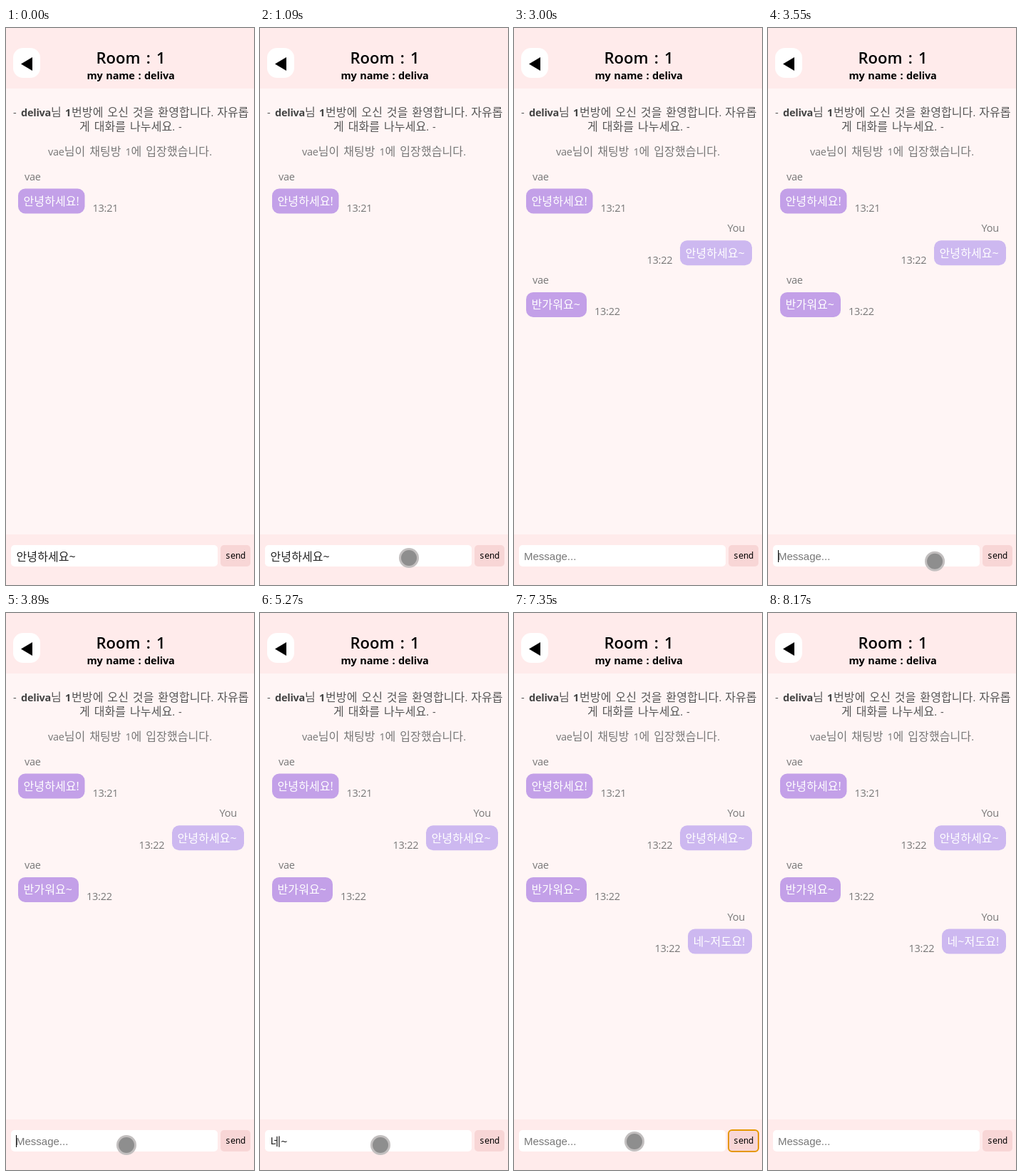
Animation, 348 px wide and 782 px high, one loop 8.24 s. Source, as an HTML page with a canvas:

```html
<!DOCTYPE html>
<html lang="ko">
<head>
<meta charset="utf-8">
<title>Chat room</title>
<style>
  html, body { margin: 0; width: 100%; height: 100%; overflow: hidden; background: #fff5f5; }
  canvas { display: block; width: 348px; height: 782px; }
</style>
</head>
<body>
<canvas id="stage"></canvas>
<script>
const W = 348, H = 782, LOOP = 8240;
const ME = 'deliva', FRIEND = 'vae';
const LATIN = '"Open Sans", "Noto Sans", sans-serif';
const HANGUL = '"Open Sans", "Noto Sans CJK KR", "Noto Sans CJK", sans-serif';

const canvas = document.getElementById('stage');
const ctx = canvas.getContext('2d');
const scale = window.devicePixelRatio || 1;
canvas.width = W * scale;
canvas.height = H * scale;

const messages = [
  { at: 0, mine: false, text: '안녕하세요!', x: 17, w: 93.5, time: '13:21', timeX: 121.5 },
  { at: 1220, mine: true, text: '안녕하세요~', x: 233, w: 101, time: '13:22', timeX: 186.5 },
  { at: 3000, mine: false, text: '반가워요~', x: 17, w: 85, time: '13:22', timeX: 113 },
  { at: 6690, mine: true, text: '네~저도요!', x: 244, w: 90, time: '13:22', timeX: 197.5 }
];

// [start time, input value]
const typing = [
  [0, '안녕하세요~'], [1220, ''], [4220, 'ㄴ'], [4350, '네'], [4810, '네~'],
  [5600, '네~ㅈ'], [5690, '네~저'], [5780, '네~젇'], [5880, '네~저도'],
  [5970, '네~저동'], [6070, '네~저도요'], [6260, '네~저도요!'], [6690, '']
];

const caretOn = [[560, 1090], [1220, 1750], [2210, 2670], [3290, 5270], [5600, 6620]];
const pointerHidden = [[1950, 3290], [4220, 4610], [4810, 4940], [5600, 6350], [7690, LOOP]];

// Stepped pointer strokes along quadratic curves
const strokes = [
  { at: 130, end: 680, steps: 9, path: [[186, 786], [196, 732], [209, 744]] },
  { at: 1750, end: 1880, steps: 3, path: [[214, 737], [230, 712], [246, 688]] },
  { at: 3290, end: 3890, steps: 8, path: [[331, 751], [240, 749], [169, 747]] },
  { at: 7350, end: 7350, steps: 1, path: [[169, 742], [169, 742], [169, 742]] },
  { at: 7550, end: 7620, steps: 2, path: [[186, 735], [195, 746], [204, 758]] }
];

const within = (spans, t) => spans.some(([a, b]) => t >= a && t < b);
const lastBefore = (list, t, key) => list.filter(item => key(item) <= t).pop();

function box(x, y, w, h, r, color) {
  ctx.fillStyle = color;
  ctx.beginPath();
  ctx.roundRect(x, y, w, h, r);
  ctx.fill();
}

function label(text, x, y, font, color, align = 'left', letter = 0, word = 0) {
  ctx.font = font;
  ctx.letterSpacing = letter + 'px';
  ctx.wordSpacing = word + 'px';
  ctx.textAlign = align;
  ctx.fillStyle = color;
  ctx.fillText(text, x, y);
}

// Draws Korean and Latin runs one after another and returns the end x
function mixed(text, x, y, color, weight = 400) {
  const runs = text.match(/[ㄱ-ㅎ가-힣~!][ㄱ-ㅎ가-힣~! ]*|[^ㄱ-ㅎ가-힣~!]+/g) || [];
  for (const run of runs) {
    const korean = /[ㄱ-ㅎ가-힣~!]/.test(run);
    const font = korean ? `${weight} 16px ${HANGUL}` : `${weight} 14.5px ${LATIN}`;
    label(run, x, y, font, color, 'left', korean ? 0.1 : -0.25, 1.6);
    x += ctx.measureText(run).width;
  }
  return x;
}

function drawHeader() {
  box(0, 0, W, 85, 0, '#ffebeb');
  box(10, 28, 38, 42, 14, '#fff');
  ctx.fillStyle = '#000';
  ctx.beginPath();
  ctx.moveTo(21, 50.5);
  ctx.lineTo(37, 41);
  ctx.lineTo(37, 60);
  ctx.fill();
  label('Room : 1', 175, 50, `600 22px ${LATIN}`, '#000', 'center', 0, 2.5);
  label(`my name : ${ME}`, 175, 72, `700 14.5px ${LATIN}`, '#000', 'center', -0.2, 1.2);
}

function drawNotices() {
  const dark = '#555', bold = '#444';
  mixed('-', 10, 124, dark);
  mixed(ME, 21, 124, bold, 700);
  mixed('님', 63, 124, dark);
  mixed('1', 83, 124, bold, 700);
  mixed('번방에 오신 것을 환영합니다. 자유롭', 92, 124, dark);
  mixed('게 대화를 나누세요. -', 103, 144, dark);
  mixed(`${FRIEND}님이 채팅방 1에 입장했습니다.`, 59, 179, '#777');
}

function drawMessage(m, i) {
  const y = 225.5 + i * 72.7;
  mixed(m.mine ? 'You' : FRIEND, m.mine ? 299.5 : 26, y - 12, '#777');
  box(m.x, y, m.w, 35, 10, m.mine ? '#cdb8f0' : '#c3a0e8');
  mixed(m.text, m.x + 7.5, y + 23.5, '#fff');
  mixed(m.time, m.timeX, y + 32.5, '#777');
}

function drawFooter(t) {
  box(0, 711, W, H - 711, 0, '#ffebeb');
  box(7, 726, 290, 30, 5, '#fff');
  box(301, 726, 42, 30, 5, '#f8d6d6');
  label('send', 322, 745, '12px "Noto Sans Mono", monospace', '#000', 'center', -0.1);
  if (t >= 6620 && t < 8170) {
    ctx.strokeStyle = '#e59700';
    ctx.lineWidth = 2;
    ctx.beginPath();
    ctx.roundRect(301, 726, 42, 30, 5);
    ctx.stroke();
  }
  const value = lastBefore(typing, t, item => item[0])[1];
  if (!value) label('Message...', 14, 747, '15px "Liberation Sans", Arial, sans-serif', '#777');
  const end = mixed(value, 14.5, 748, '#222');
  if (within(caretOn, t)) {
    ctx.fillStyle = '#000';
    ctx.fillRect(Math.floor(end), 733, 1, 17);
  }
}

function drawPointer(t) {
  const s = lastBefore(strokes, t, item => item.at);
  if (!s || within(pointerHidden, t)) return;
  const last = s.steps - 1;
  const step = last ? Math.min(last, Math.floor((t - s.at) / (s.end - s.at) * last)) : 0;
  const p = last ? 1 - (1 - step / last) ** 1.5 : 1;
  const [x, y] = [0, 1].map(k =>
    s.path[0][k] * (1 - p) ** 2 + s.path[1][k] * 2 * p * (1 - p) + s.path[2][k] * p * p);
  for (const [r, color] of [[14, '#c2bfbf'], [11, '#8e8e8e']]) {
    ctx.fillStyle = color;
    ctx.beginPath();
    ctx.arc(x, y, r, 0, Math.PI * 2);
    ctx.fill();
  }
}

const start = performance.now();

function draw() {
  const t = (performance.now() - start) % LOOP;
  ctx.setTransform(scale, 0, 0, scale, 0, 0);
  box(0, 0, W, H, 0, '#fff5f5');
  drawHeader();
  drawNotices();
  messages.forEach((m, i) => { if (t >= m.at) drawMessage(m, i); });
  drawFooter(t);
  drawPointer(t);
  requestAnimationFrame(draw);
}
draw();
</script>
</body>
</html>
```
